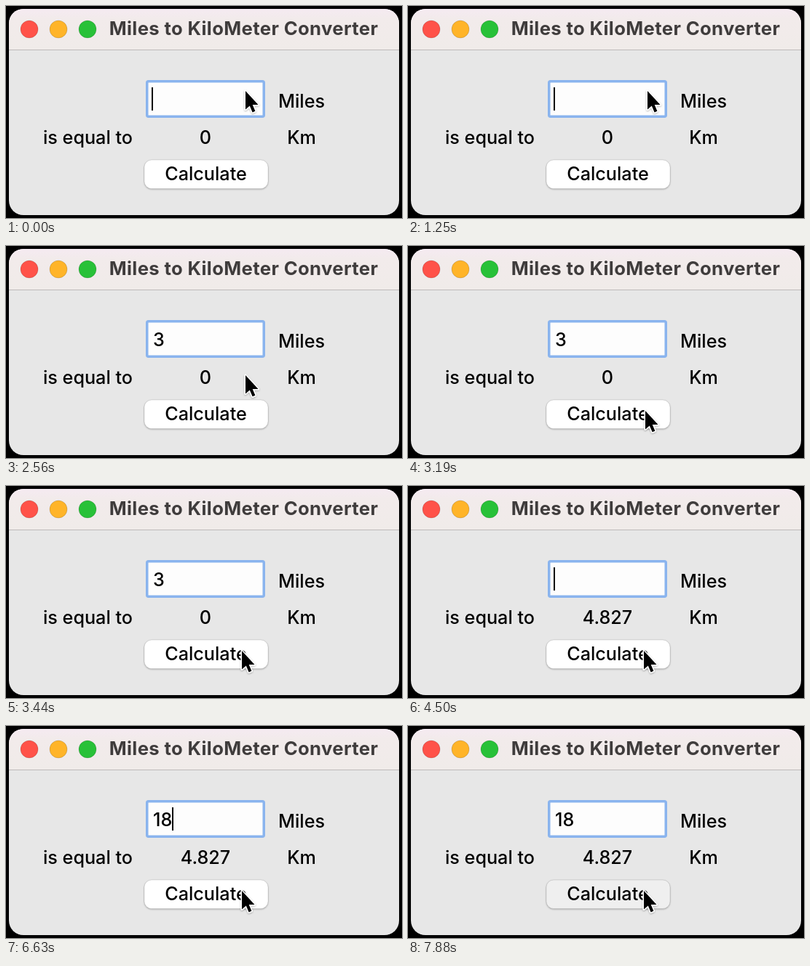
Recreate the animation shown at these times as an HTML page. Size 544 px wide and 292 px high, loop 8 s.

```html
<!DOCTYPE html>
<html lang="en">
<head>
<meta charset="utf-8">
<title>Miles to KiloMeter Converter</title>
<style>
  html, body { margin: 0; width: 100%; height: 100%; overflow: hidden; background: #000; }
  svg { display: block; }
  text { font: 500 25.2px Inter, "Liberation Sans", sans-serif; fill: #000; }
  .title { font-size: 25.7px; font-weight: 700; letter-spacing: .35px; fill: #3f3c3c; }
  .mid { text-anchor: middle; }
</style>
</head>
<body>
<svg width="544" height="292" viewBox="0 0 544 292">
  <defs>
    <linearGradient id="bar" x2="0" y2="1">
      <stop offset="0" stop-color="#f5eaf1"/>
      <stop offset=".25" stop-color="#f2ebeb"/>
      <stop offset="1" stop-color="#f0ebe9"/>
    </linearGradient>
    <clipPath id="window"><rect x="4" y="4" width="536" height="284" rx="20"/></clipPath>
    <filter id="soft" x="-20%" y="-20%" width="140%" height="160%">
      <feDropShadow dx="0" dy="1" stdDeviation="1" flood-opacity=".3"/>
    </filter>
  </defs>

  <g clip-path="url(#window)">
    <rect width="544" height="292" fill="#e7e7e7"/>
    <rect y="4" width="544" height="56" fill="url(#bar)"/>
    <rect y="60" width="544" height="1" fill="#bdbab9"/>
  </g>
  <g stroke-opacity=".15" stroke="#000">
    <circle cx="32" cy="32" r="12" fill="#ff5249"/>
    <circle cx="72" cy="32" r="12" fill="#ffb429"/>
    <circle cx="112" cy="32" r="12" fill="#28c138"/>
  </g>
  <text class="title mid" x="326.5" y="40">Miles to KiloMeter Converter</text>

  <rect x="193.75" y="103.75" width="160.5" height="48.5" rx="2" fill="#fdfdfd" stroke="#8ab4ee" stroke-width="3.5"/>
  <text id="entry" x="202" y="138"></text>
  <rect id="caret" y="112" width="2" height="32"/>

  <text class="mid" x="406" y="140">Miles</text>
  <text class="mid" x="112.5" y="190">is equal to</text>
  <text id="result" class="mid" x="274" y="190"></text>
  <text class="mid" x="406" y="190">Km</text>

  <rect id="button" x="190" y="212" width="170" height="39.5" rx="10"
    stroke="#000" stroke-opacity=".1" filter="url(#soft)"/>
  <text class="mid" x="274.5" y="240">Calculate</text>

  <path id="pointer" d="M0 0V25.5L5.8 20.5 9.6 29.4 13.4 27.8 9.7 19H17.5Z"
    stroke="#fff" stroke-width="3" stroke-linejoin="round" paint-order="stroke" filter="url(#soft)"/>
</svg>
<script>
const LOOP = 8000;
const $ = id => document.getElementById(id);

// Each edit restarts the caret blink
const edits = [[-190, ""], [1685, "3"], [4380, ""], [5810, "1"], [6190, "18"]];
const BLINK = 900, LIT = 600;
const MOVE = 2310, PRESS = 3250, RELEASE = 3440, ANSWER = 3500, PRESS_AGAIN = 7880;

function draw(now) {
  const t = now % LOOP;
  const [since, text] = edits.filter(e => e[0] <= t).pop();
  $("entry").textContent = text;
  const width = $("entry").getComputedTextLength();
  $("caret").setAttribute("x", text ? Math.round(202 + width) : 200);
  $("caret").setAttribute("visibility", (t - since) % BLINK < LIT ? "visible" : "hidden");

  const pressed = (t >= PRESS && t < RELEASE) || t >= PRESS_AGAIN;
  $("button").setAttribute("fill", pressed ? "#efefef" : "#fff");
  $("result").textContent = t < ANSWER ? "0" : (3 * 1.609).toFixed(3);

  // Glide down to the button, settling slightly left at the end
  const k = Math.min(Math.max((t - MOVE) / (PRESS - MOVE), 0), 1);
  const x = 329 - 5 * k ** 8;
  const y = 117 + 110 * (1 - (1 - k) ** 2.6);
  $("pointer").setAttribute("transform", `translate(${x} ${y})`);
}

const start = performance.now();
function tick() {
  draw(performance.now() - start);
  requestAnimationFrame(tick);
}
tick();
</script>
</body>
</html>
```
